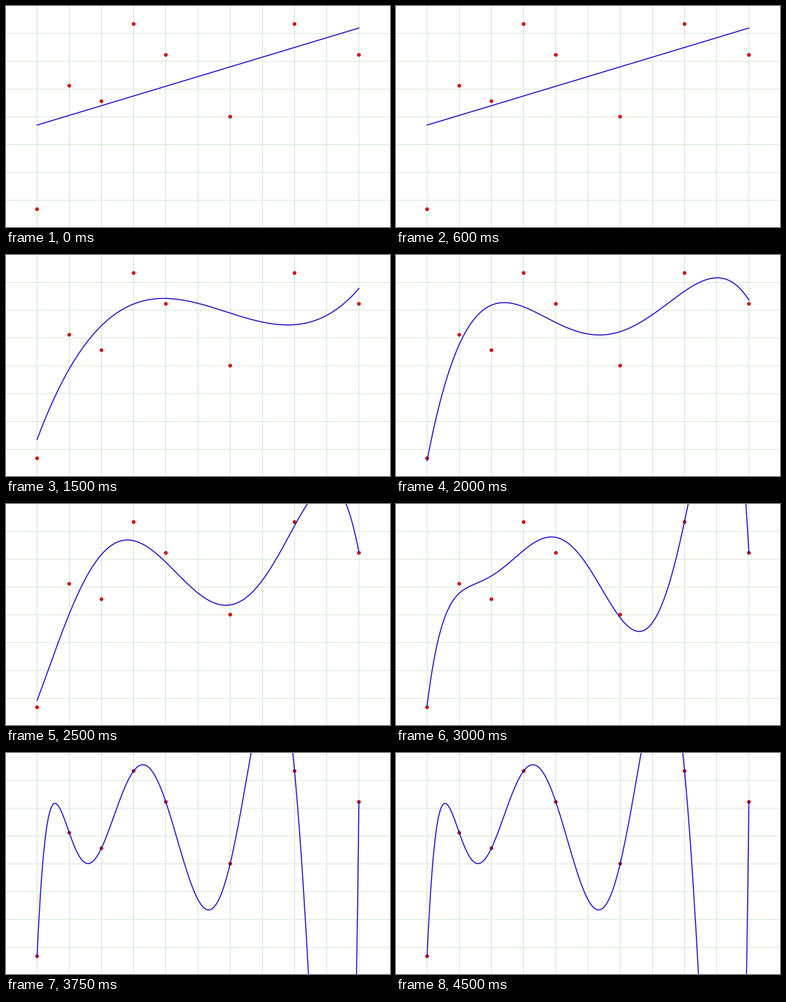
A matplotlib script that plays this animation: 525 by 302 pixels, repeating every 5000 ms.

```python
import numpy as np
import matplotlib.pyplot as plt
from matplotlib.animation import FuncAnimation
from matplotlib.patches import Circle

W, H, DPI = 525, 302, 100
STEP = 250  # ms per frame
STARTS = [0, 1000, 1500, 2000, 2500, 3000, 3750]  # when each degree appears
LOOP = 5000

X0, DX = 42.5, 44.0
Y0, DY = 298.9, 21.1
xs = np.array([0, 1, 2, 3, 4, 6, 8, 10])
ys = np.array([1, 9, 8, 13, 11, 7, 13, 11])


def px(x):
    return X0 + DX * np.asarray(x)


def py(y):
    return Y0 - DY * np.asarray(y)


def pt(pixels):
    return pixels * 72 / DPI


def fit(degree):
    return np.polynomial.Polynomial.fit(xs, ys, degree)


fig = plt.figure(figsize=(W / DPI, H / DPI), dpi=DPI, facecolor="white")
ax = fig.add_axes([0, 0, 1, 1])
ax.set_xlim(0, W)
ax.set_ylim(H, 0)
ax.axis("off")

# Unsnapped, so each line covers exactly one pixel row or column
grid = dict(lw=pt(1), snap=False, zorder=1)
for k in range(11):
    ax.axvline(px(k), color="#d2e8d2", **grid)
for k in range(7):
    ax.axhline(37.5 + 38 * k, color="#dae9da", **grid)

for x, y in zip(px(xs), py(ys)):
    ax.add_patch(Circle((x, y), 2, fc="#fa1414", ec="#a80a0a",
                        lw=pt(1), zorder=2))
curve, = ax.plot([], [], color="#2000c4", lw=pt(1.35), zorder=3)

t = np.linspace(0, 10, 201)
paths = [py(fit(d)(t)) for d in range(1, 8)]


def draw(i):
    shown = sum(i * STEP >= s for s in STARTS) - 1
    curve.set_data(px(t), paths[shown])
    return curve,


anim = FuncAnimation(fig, draw, frames=LOOP // STEP, interval=STEP,
                     init_func=lambda: draw(0), repeat=True, repeat_delay=0)
plt.show()
```
